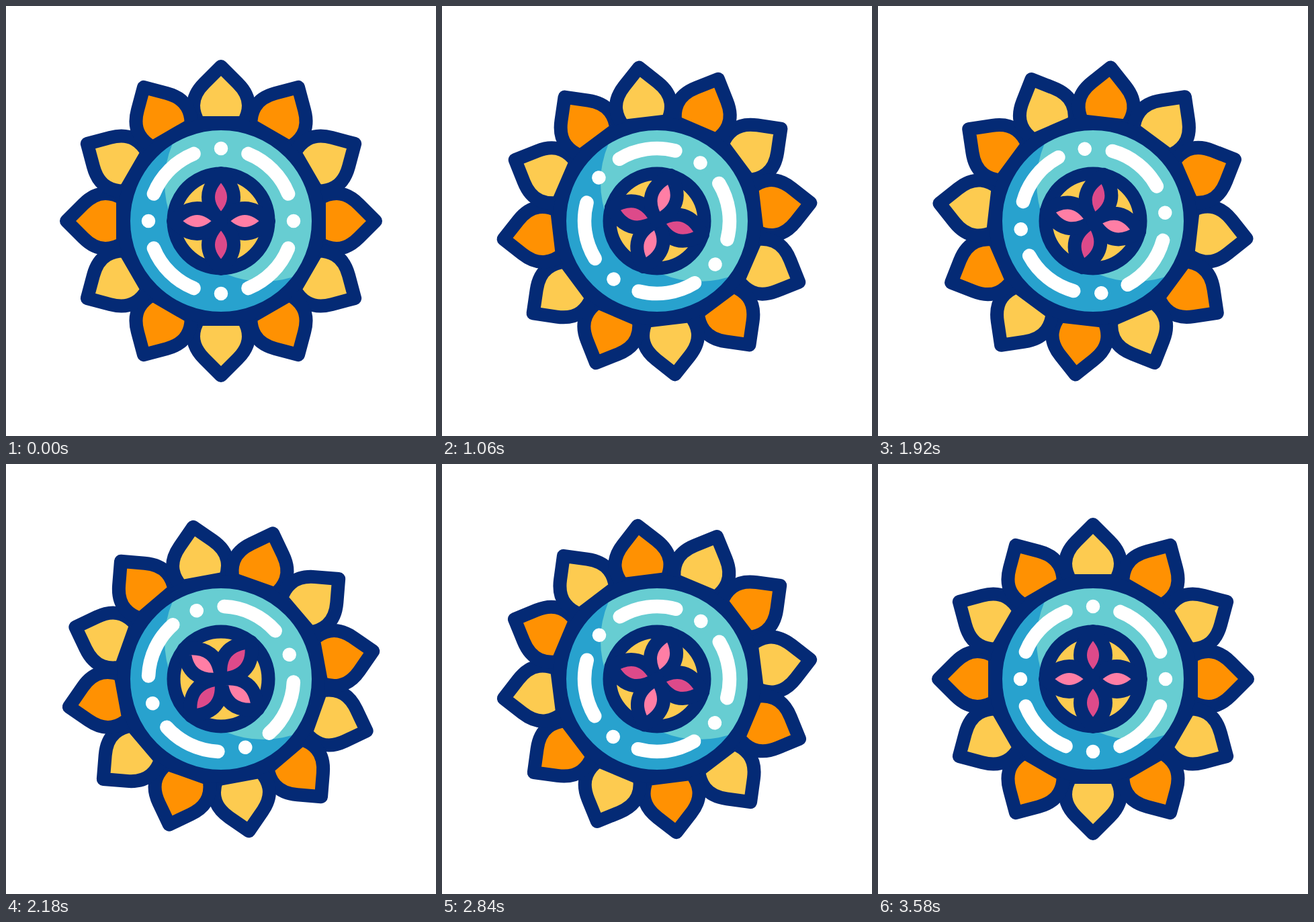
These frames come from a looping animation (640x640 px, 3600 ms). An HTML page:

```html
<!DOCTYPE html>
<html lang="en">
<head>
<meta charset="utf-8">
<title>Spinning mandala</title>
<style>
  html, body { margin: 0; width: 100%; height: 100%; overflow: hidden; background: #fff; }
  svg { display: block; width: 100vw; height: 100vh; }
  .outlined { stroke: #042a75; stroke-width: 20; stroke-linejoin: round; }
  .marks { fill: none; stroke: #fff; stroke-width: 20.5; stroke-linecap: round; }
</style>
</head>
<body>
<svg viewBox="-320 -320 640 640">
  <defs>
    <path id="petal" d="M0-230 L25-205 C36-194 41-184 41-172 C41-162 38-154 33-146
      H-33 C-38-154 -41-162 -41-172 C-41-184 -36-194 -25-205Z"/>
    <path id="leaf" d="M0 0 Q38-35.5 0-71 Q-38-35.5 0 0Z"/>
    <!-- one dot and one dash, a quarter of the ring -->
    <path id="mark" d="M0-108 h.01 M40.5-100.1 A108 108 0 0 1 100.1-40.5"/>
    <clipPath id="disc"><circle r="136"/></clipPath>
  </defs>
  <g id="petals" class="outlined"></g>
  <circle r="145" fill="#28a2ce"/>
  <circle cx="63" cy="-57" r="147" fill="#67cdd2" clip-path="url(#disc)"/>
  <circle r="145" fill="none" class="outlined"/>
  <g id="marks" class="marks"></g>
  <circle r="70.5" fill="#fdcb50" class="outlined"/>
  <g id="leaves" class="outlined"></g>
</svg>
<script>
  const group = id => document.getElementById(id);

  function repeat(id, shape, count, colors) {
    for (let i = 0; i < count; i++) {
      const use = document.createElementNS('http://www.w3.org/2000/svg', 'use');
      use.setAttribute('href', '#' + shape);
      use.setAttribute('fill', colors[i % colors.length]);
      use.setAttribute('transform', `rotate(${i * 360 / count})`);
      group(id).append(use);
    }
  }

  repeat('petals', 'petal', 12, ['#fdcb50', '#ff9102']);
  repeat('marks', 'mark', 4, ['none']);
  repeat('leaves', 'leaf', 4, ['#dd4a8a', '#ff7ea5']);

  const LOOP = 3600, STEP = 20, LAST = LOOP / STEP - 1;
  const turns = { petals: 180, marks: -180, leaves: 360 };

  // The last step shows the same pose as the first.
  function draw() {
    const progress = Math.floor(performance.now() % LOOP / STEP) / LAST;
    for (const id in turns)
      group(id).setAttribute('transform', `rotate(${turns[id] * progress})`);
    requestAnimationFrame(draw);
  }
  draw();
</script>
</body>
</html>
```
